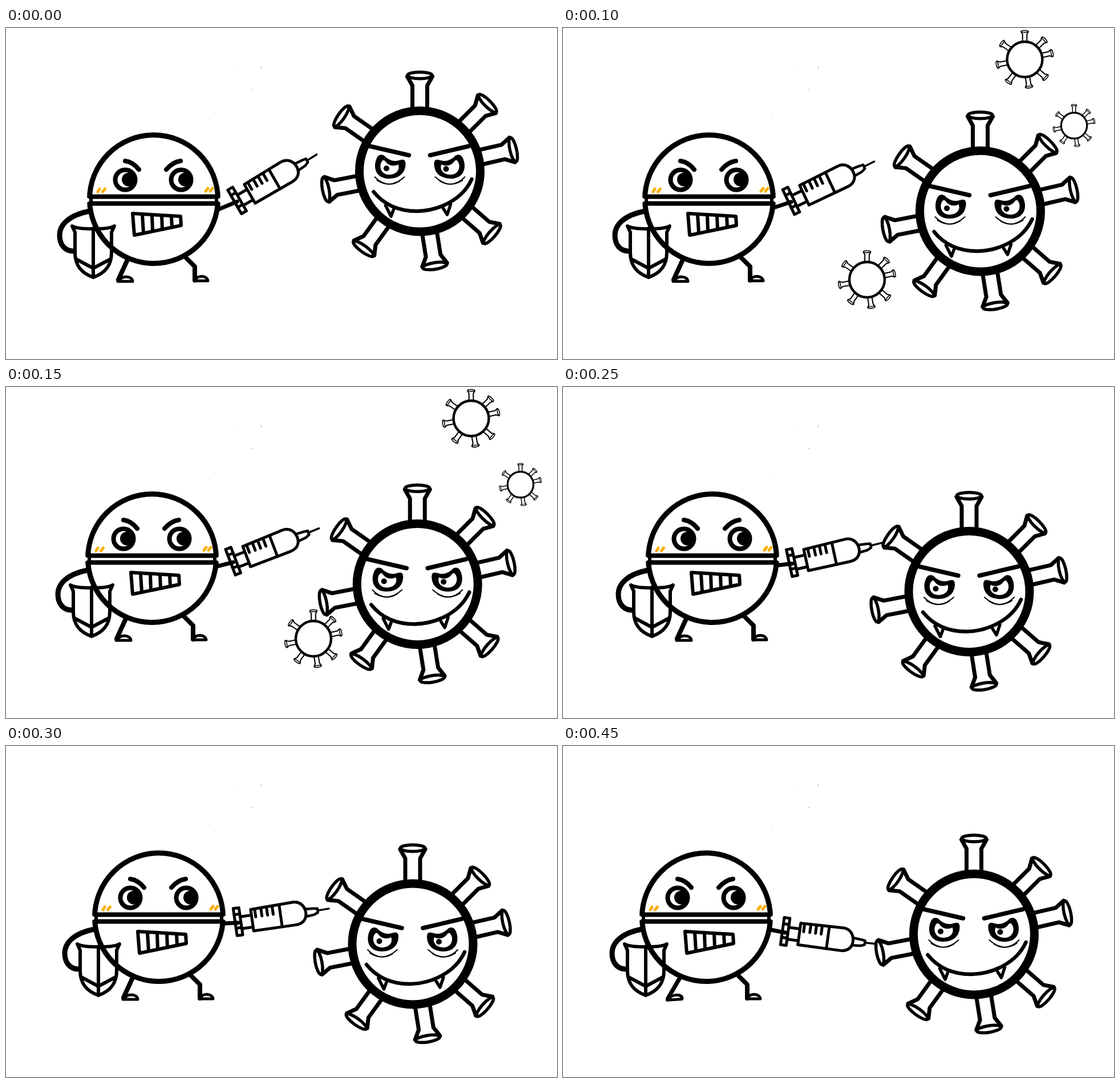
An HTML page that plays this animation: 966x580 px, repeating every 0.55 s.

```html
<!DOCTYPE html>
<html lang="en">
<head>
<meta charset="utf-8">
<title>Pill against virus</title>
<style>
  html, body { margin: 0; width: 100%; height: 100%; overflow: hidden; background: #fff; }
  svg { display: block; width: 966px; height: 580px; }
  g, path, line { stroke-linecap: round; stroke-linejoin: round; }
</style>
</head>
<body>
<svg viewBox="0 0 966 580" fill="none" stroke="#000">
  <defs>
    <g id="spike" fill="#fff">
      <path d="M-22 2L-13 18V66H13V18L22 2" stroke-width="7"/>
      <ellipse rx="21.7" ry="5.8" stroke-width="5.5"/>
    </g>
    <g id="germ">
      <g id="spikes"></g>
      <circle r="106" fill="#fff" stroke-width="15"/>
    </g>
    <g id="eye" stroke="none">
      <path fill="#000" d="M-75 -24C-82 -10 -80 12 -55 13C-33 13 -25 0 -25 -13C-25 -22 -31 -21 -37 -19C-45 -16 -55 -20 -61 -26C-66 -31 -72 -29 -75 -24Z"/>
      <path fill="#fff" d="M-66 -18C-73 -9 -68 6 -54 6C-41 6 -34 -3 -38 -12C-45 -8 -55 -9 -61 -18Q-64 -21 -66 -18Z"/>
      <path stroke="#000" stroke-width="2" d="M-79 10Q-55 35 -27 10M-75 16Q-54 29 -35 17" fill="none"/>
    </g>
  </defs>

  <path fill="#aaa" stroke="none" d="M447 67h1v4h-1zM430 107h1.500v1.500h-1.500zM404 67h1v1h-1zM366 149h1v1h-1z"/>

  <g id="pill">
    <circle cx="259" cy="300" r="112.500" stroke-width="9"/>
    <path d="M142 301.500H376" stroke="#fff" stroke-width="8"/>
    <path d="M147 295.500H371M147 307.500H371" stroke-width="8"/>
    <path d="M149 296V307M369 296V307" stroke-width="6"/>
    <path d="M146 321C110 328 94 345 94 363C94 380 103 390 117 391" stroke-width="9"/>
    <g stroke-width="6">
      <path d="M116 347Q124 352 153 352Q182 352 190 347L185 358V394C185 418 172 430 153 437C134 430 121 418 121 394V358Z"/>
      <path d="M153 351V436M123 405L153 421L183 405"/>
      <path d="M222 325L306 330L307 346L225 363Z"/>
      <path d="M239 327L241 359M256 328L257 356M273 329L274 353M290 330L291 349"/>
    </g>
    <g stroke-width="8">
      <circle cx="209" cy="266" r="17.500"/>
      <circle cx="307" cy="266" r="17.500"/>
      <path d="M209 233Q223 235 233 248M306 233Q292 235 281 248"/>
    </g>
    <g fill="#000" stroke="none">
      <circle cx="215" cy="265.500" r="12"/>
      <circle cx="314" cy="265.500" r="12"/>
    </g>
    <path stroke="#f9ae0b" stroke-width="5" d="M161 287L164 282M169.500 287L173.500 282M350 286L354 281M358 286L362 281"/>
    <g transform="translate(213 406)">
      <g id="backLeg">
        <path d="M0 0L-16 35" stroke-width="8"/>
        <path d="M-17 38H9C8 28 -9 28 -13 35" stroke-width="5"/>
      </g>
    </g>
    <path d="M316 403L331 418V442" stroke-width="8"/>
    <path d="M330 443H354C352 433 336 433 332 441" stroke-width="5"/>
  </g>

  <g id="syringe" stroke-width="5">
    <path d="M5 -8H25M5 13H25"/>
    <path d="M-5 -24H5V24H-5Z" fill="#fff"/>
    <path d="M-5 -13H5M-5 11H5"/>
    <path d="M25 -18L100 -20C113 -20 120 -10 120 1C120 13 112 20 100 20H25Z" fill="#fff"/>
    <path d="M75.500 -19V20M32 -18V-4M43 -18V-4M53 -18V-4M63 -18V-4"/>
    <path d="M121 -5L134 -4L141 -3V4L134 7L121 8" stroke-width="4.500"/>
    <path d="M142 .5L161 0" stroke-width="3.500"/>
  </g>
  <line id="arm" stroke-width="7"/>

  <g id="swarm">
    <use href="#germ" transform="translate(809.500 55) scale(.292)"/>
    <use href="#germ" transform="translate(896 171) scale(.214)"/>
    <use href="#germ" transform="translate(533 441) scale(.292)"/>
  </g>

  <g id="virus">
    <use href="#germ"/>
    <path d="M-88 -44L-19 -28M18 -28L86 -44" stroke-width="7.500"/>
    <use href="#eye"/>
    <use href="#eye" transform="scale(-1 1)"/>
    <g fill="#000" stroke="none">
      <circle cx="-58.500" cy="-5" r="5"/>
      <circle cx="46" cy="-4" r="5"/>
    </g>
    <path d="M-60 60L-50.500 79L-46 67M41 65L48 76L54 58" stroke-width="5.500" fill="#fff"/>
    <path d="M-81 36C-61 61 -35 70 -5 70C35 69 75 49 91 14" stroke-width="6.500"/>
  </g>
</svg>
<script>
  const el = id => document.getElementById(id);
  const transform = (id, value) => el(id).setAttribute('transform', value);

  el('spikes').innerHTML = [0, 45, 77, 131, 171, 216, 259, 305].map(angle =>
    `<use href="#spike" transform="rotate(${angle}) translate(0 -168)"/>`).join('');

  const BEAT = 50, LOOP = 550;

  // Key poses; the early ones are two beats apart, the last three one beat.
  const tracks = {
    virusX: [725.5, 731.5, 711, 713, 694.5, 720.5],
    virusY: [251, 321, 370, 347, 387, 330],
    pillX: [0, -3, -3, 9, 2, -8],
    aim: [-30, -25.3, -16.5, -8.2, -12.5, 7.8],
    shoulderY: [318, 315, 314, 311, 312, 322]
  };

  function valueAt(track, key) {
    const i = Math.floor(key);
    const next = track[Math.min(i + 1, track.length - 1)];
    return track[i] + (next - track[i]) * (key - i);
  }

  function draw(time) {
    // Beats 6 and 8 are held for double length.
    const tick = Math.floor(time % LOOP / BEAT);
    const beat = Math.min(8, tick > 6 ? tick - 1 : tick);
    const key = beat < 6 ? beat / 2 : beat - 3;
    const { virusX, virusY, pillX, aim, shoulderY } = Object.fromEntries(
      Object.entries(tracks).map(([name, track]) => [name, valueAt(track, key)]));

    transform('virus', `translate(${virusX} ${virusY})`);
    transform('pill', `translate(${pillX} 0)`);

    // The arm stretches as the syringe swings away from level.
    const reach = 25 + 0.013 * aim * aim;
    const armAngle = 0.85 * aim * Math.PI / 180;
    const shoulderX = 372 + pillX;
    const handX = shoulderX + reach * Math.cos(armAngle);
    const handY = shoulderY + reach * Math.sin(armAngle);
    transform('syringe', `translate(${handX} ${handY}) rotate(${aim})`);
    const ends = { x1: shoulderX, y1: shoulderY, x2: handX, y2: handY + 2 };
    for (const name in ends) el('arm').setAttribute(name, ends[name]);

    const lean = Math.max(0, aim);
    transform('backLeg', `skewX(${-lean}) skewY(${-lean / 2})`);

    const drift = beat - 2;
    el('swarm').setAttribute('visibility', drift === 0 || drift === 1 ? 'visible' : 'hidden');
    transform('swarm', `translate(${6 * drift} 0)`);
  }

  const origin = performance.now();
  function frame() {
    draw(performance.now() - origin);
    requestAnimationFrame(frame);
  }
  frame();
</script>
</body>
</html>
```
